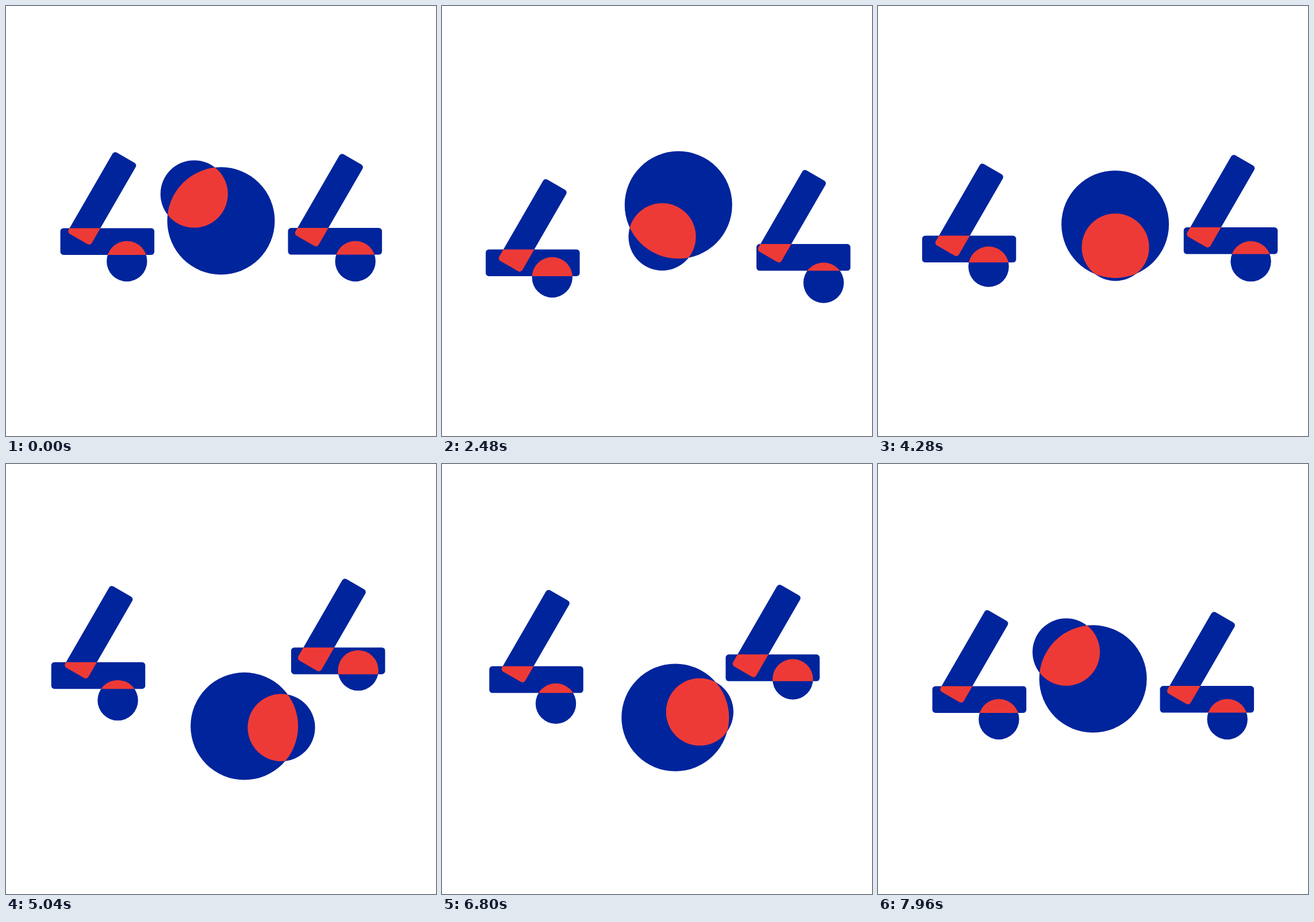
An HTML page that plays this animation: 748x748 px, repeating every 8000 ms.

```html
<!DOCTYPE html>
<html lang="en">
<head>
<meta charset="utf-8">
<title>404</title>
<style>
  html, body { margin: 0; width: 100%; height: 100%; overflow: hidden; background: #fff; }
  svg { display: block; width: 100%; height: 100%; }
</style>
</head>
<body>
<svg id="stage" viewBox="0 0 748 748"></svg>
<script>
const LOOP = 8000, FRAME = 40;
const BLUE = '#00249c', RED = '#ee3a36';
const NS = 'http://www.w3.org/2000/svg';
const stage = document.getElementById('stage');

function add(parent, tag, attrs) {
  const node = document.createElementNS(NS, tag);
  for (const key in attrs) node.setAttribute(key, attrs[key]);
  return parent.appendChild(node);
}

const bar = { tag: 'rect', attrs: { x: -81.75, y: -23.25, width: 163.5, height: 46.5, rx: 5.5 } };
const stick = { ...bar, turn: -60 };
const disc = r => ({ tag: 'circle', attrs: { r } });

// Each part visits three centre positions in turn.
const parts = {
  bar1: { ...bar, stops: [[176.3, 409.7], [157.6, 447.1], [160.6, 365.3]] },
  stick1: { ...stick, stops: [[167.3, 334.6], [157.7, 382.1], [161.5, 289.6]] },
  dot1: { ...disc(35.2), stops: [[210.3, 444], [191.5, 472.3], [194.6, 409.1]] },
  big: { ...disc(93.5), stops: [[374, 373.8], [411.7, 345.7], [414.7, 459.8]] },
  small: { ...disc(58.6), stops: [[327.3, 327], [383.7, 402.4], [482.2, 460.4]] },
  bar2: { ...bar, stops: [[572.3, 409.3], [629.4, 437.6], [576, 339.2]] },
  stick2: { ...stick, stops: [[561.9, 337.7], [609.3, 365.9], [565.4, 277.1]] },
  dot2: { ...disc(35.2), stops: [[607.7, 444], [664.5, 481.9], [610.9, 355]] }
};
const overlaps = [
  ['stick1', 'bar1'], ['dot1', 'bar1'], ['small', 'big'], ['stick2', 'bar2'], ['dot2', 'bar2']
];

function draw(part, parent, attrs) {
  const node = add(parent, part.tag, { ...part.attrs, ...attrs });
  part.nodes.push(node);
}

for (const name in parts) {
  const part = parts[name];
  part.nodes = [];
  draw(part, add(stage, 'clipPath', { id: 'clip-' + name }), {});
  draw(part, stage, { fill: BLUE });
}
for (const [top, under] of overlaps) {
  const group = add(stage, 'g', { 'clip-path': `url(#clip-${under})` });
  draw(parts[top], group, { fill: RED });
}

// Cubic bezier easing with control points (0.93, 0) and (0.586, 1).
function ease(x) {
  let low = 0, high = 1;
  for (let i = 0; i < 30; i++) {
    const s = (low + high) / 2, r = 1 - s;
    if (3 * 0.93 * s * r * r + 3 * 0.586 * s * s * r + s ** 3 < x) low = s;
    else high = s;
  }
  return low * low * (3 - 2 * low);
}

function render(time) {
  const t = Math.floor((time % LOOP) / FRAME) * FRAME;
  const phase = t / LOOP * 3;
  const leg = Math.floor(phase);
  const k = ease(phase - leg);
  for (const part of Object.values(parts)) {
    const from = part.stops[leg], to = part.stops[(leg + 1) % 3];
    const [x, y] = from.map((v, i) => v + (to[i] - v) * k);
    const place = `translate(${x.toFixed(2)} ${y.toFixed(2)}) rotate(${part.turn || 0})`;
    for (const node of part.nodes) node.setAttribute('transform', place);
  }
}

const start = performance.now();
function tick() {
  render(performance.now() - start);
  requestAnimationFrame(tick);
}
render(0);
requestAnimationFrame(tick);
</script>
</body>
</html>
```
